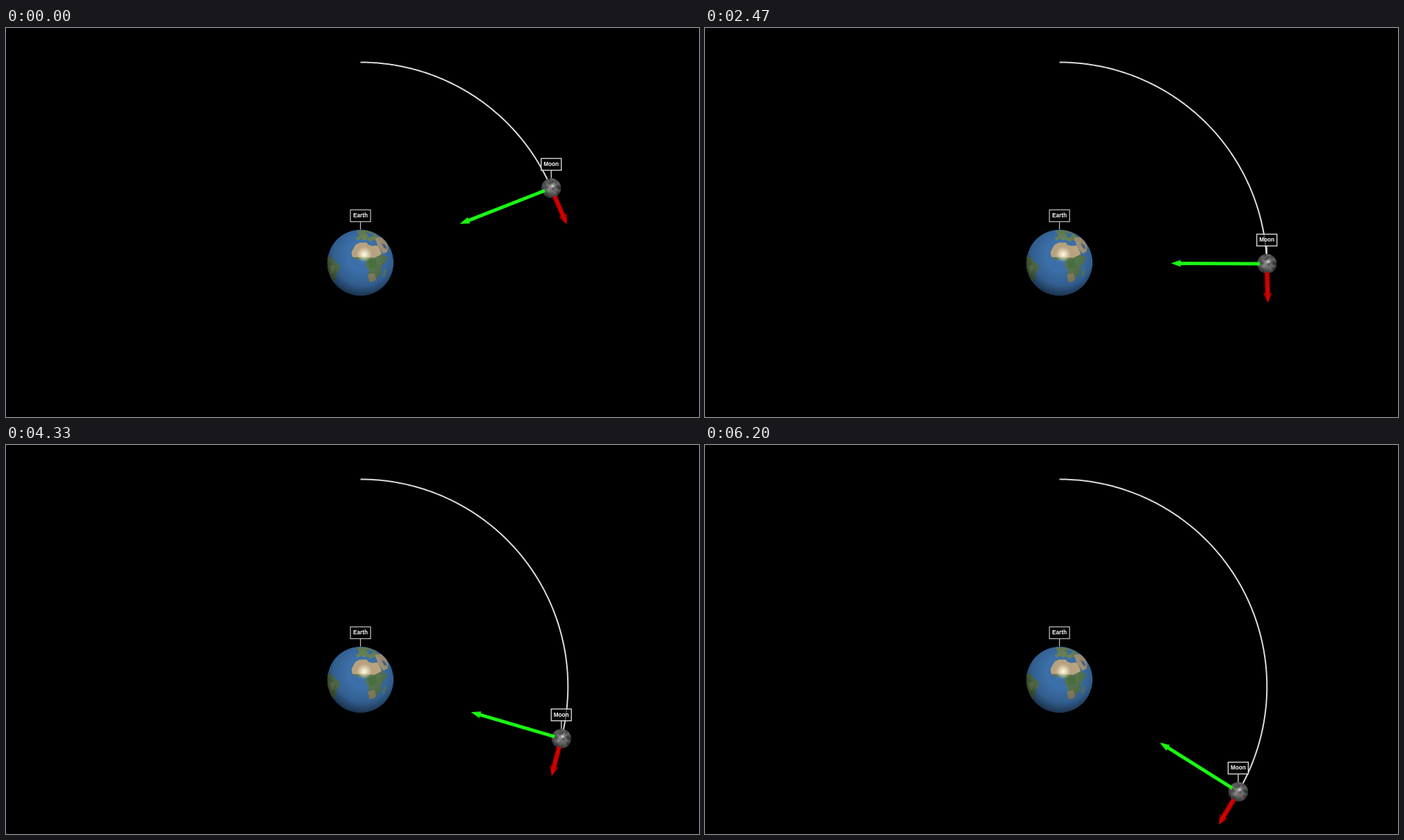
These frames come from a looping animation (998x561 px, 6.23 s). An HTML page with a canvas:

```html
<!DOCTYPE html>
<html lang="en">
<head>
<meta charset="utf-8">
<title>Moon orbit</title>
<style>
html, body { margin: 0; width: 100%; height: 100%; overflow: hidden; background: #000; }
canvas { display: block; }
</style>
</head>
<body>
<canvas id="stage" width="998" height="561"></canvas>
<script>
const ctx = document.getElementById('stage').getContext('2d');
const LOOP = 6230, TAU = Math.PI * 2, RAD = Math.PI / 180;
const EX = 510.5, EY = 338.5, ER = 47.7, MR = 14.2;
const P = 298.6, ECC = 0.033; // Kepler ellipse, closest point straight up

function orbit(a) {
  const r = P / (1 + ECC * Math.cos(a));
  return { r, x: EX + r * Math.sin(a), y: EY - r * Math.cos(a) };
}

function disc(x, y, r, fill) {
  ctx.fillStyle = fill;
  ctx.beginPath();
  ctx.arc(x, y, r, 0, TAU);
  ctx.fill();
}

function gradient(x, y, r, stops) {
  const g = ctx.createRadialGradient(x, y, 0, x, y, r);
  stops.forEach(([at, color]) => g.addColorStop(at, color));
  return g;
}

function shape(path, fill) {
  ctx.fillStyle = fill;
  ctx.fill(new Path2D(path));
}

function clipDisc(r) {
  ctx.beginPath();
  ctx.arc(0, 0, r, 0, TAU);
  ctx.clip();
}

function earth() {
  ctx.save();
  ctx.translate(EX, EY);
  clipDisc(ER);
  disc(0, 0, ER, '#3c70aa');
  // Europe and the north
  shape('M-6-46L8-47L20-42L28-36L31-31L24-30L19-33L14-30L10-34L5-32L1-35L-5-32L-7-36L-2-38L-3-42Z', '#6b8455');
  shape('M7-44L12-39L9-36L16-37L19-41Z', '#3c70aa');
  // Asia Minor and Arabia
  shape('M21-36L30-37L37-30L40-22L39-16L33-13L28-20L24-27Z', '#a8977a');
  shape('M30-29L36-25L38-20L34-21Z', '#47698e');
  // Africa
  const africa = 'M-7-26L-1-29L9-29L11-26L17-24L25-25L29-17L33-9L39-9L35 0L30 6L30 14L25 20L20 27L13 28L11 19L12 12L8 4L8-2L3-5L-6-4L-12-9L-13-15L-10-21Z';
  shape(africa, '#56754d');
  ctx.save();
  ctx.clip(new Path2D(africa));
  shape('M-15-31H31L30-12L20-7L6-8L-13-8Z', '#bba582');
  shape('M10 17L20 15L23 25L12 30Z', '#8a8362');
  shape('M9-4L22-5L24 6L14 9Z', '#47703f');
  ctx.restore();
  shape('M34 11L37 8L35 19L31 21Z', '#68805a');
  // South America
  shape('M-49-9L-41-8L-37-2L-30 3L-30 9L-34 15L-36 23L-40 31L-44 29L-49 10Z', '#56764e');
  shape('M-45 4L-37 4L-39 14L-43 16Z', '#75875a');
  // Light
  disc(0, 0, ER, gradient(4, -11, 62, [
    [0, 'rgba(255,255,255,.12)'], [.35, 'rgba(0,0,0,0)'],
    [.7, 'rgba(0,0,0,.16)'], [1, 'rgba(0,0,0,.62)']]));
  disc(5.5, -12, 11, gradient(5.5, -12, 11, [
    [0, 'rgba(255,255,235,.95)'], [.3, 'rgba(255,250,220,.7)'], [1, 'rgba(255,240,200,0)']]));
  ctx.restore();
}

function moon(x, y) {
  ctx.save();
  ctx.translate(x, y);
  clipDisc(MR);
  disc(0, 0, MR, '#797979');
  let seed = 11;
  const rnd = () => (seed = seed * 16807 % 2147483647) / 2147483647;
  for (let i = 0; i < 46; i++) {
    const a = rnd() * TAU, d = Math.sqrt(rnd()) * MR;
    disc(d * Math.cos(a), d * Math.sin(a), .6 + rnd() * 2.2,
      rnd() < .6 ? 'rgba(45,45,48,.35)' : 'rgba(165,165,165,.35)');
  }
  disc(0, 0, MR, gradient(1, -3, 18, [
    [0, 'rgba(255,255,255,.12)'], [.4, 'rgba(0,0,0,.05)'], [1, 'rgba(0,0,0,.65)']]));
  disc(2, -3, 3, gradient(2, -3, 3, [[0, 'rgba(255,255,255,.75)'], [1, 'rgba(255,255,255,0)']]));
  ctx.restore();
}

function arrow(x, y, angle, from, to, width, headWidth, edge, core) {
  ctx.save();
  ctx.translate(x, y);
  ctx.rotate(angle);
  const w = width / 2, h = headWidth / 2, neck = to - 14;
  const g = ctx.createLinearGradient(0, -h, 0, h);
  [[0, edge], [.45, core], [.55, core], [1, edge]].forEach(([at, c]) => g.addColorStop(at, c));
  shape(`M${from} ${-w}H${neck}V${-h}L${to} 0L${neck} ${h}V${w}H${from}Z`, g);
  ctx.restore();
}

function label(text, x, y, radius, color) {
  const bottom = y - radius - 11.5;
  ctx.strokeStyle = color;
  ctx.lineWidth = 1.3;
  ctx.beginPath();
  ctx.moveTo(x, y - radius);
  ctx.lineTo(x, bottom);
  ctx.stroke();
  ctx.fillStyle = 'rgba(0,0,0,.66)';
  ctx.fillRect(x - 14.5, bottom - 17, 29, 17);
  ctx.strokeRect(x - 14.5, bottom - 17, 29, 17);
  ctx.fillStyle = '#fff';
  ctx.font = 'bold 8.2px "Liberation Sans", Arial, sans-serif';
  ctx.textAlign = 'center';
  ctx.textBaseline = 'alphabetic';
  ctx.fillText(text, x, bottom - 6);
}

function trail(end) {
  ctx.beginPath();
  for (let i = 0; i <= 150; i++) {
    const p = orbit(end * i / 150);
    ctx.lineTo(p.x, p.y);
  }
  ctx.strokeStyle = '#dcdcd8';
  ctx.lineWidth = 2;
  ctx.stroke();
}

function draw(ms) {
  const s = Math.floor((ms % LOOP + 3.4) / (100 / 3)) / 30; // 30 steps a second
  const a = (68.6 + 8.9 * s - 0.043 * s * s) * RAD;
  const { r, x, y } = orbit(a);
  const vr = ECC * Math.sin(a), vt = 1 + ECC * Math.cos(a);

  ctx.fillStyle = '#000';
  ctx.fillRect(0, 0, 998, 561);
  trail(a);
  earth();
  moon(x, y);
  // Velocity, then gravity falling off with the square of the distance
  arrow(x, y, a - Math.atan2(vr, vt), 12.5, 56 * Math.hypot(vr, vt), 7, 13, '#6a0000', '#d80000');
  arrow(x, y, Math.atan2(EY - y, EX - x), 10, 12.31e6 / (r * r), 5, 10, '#12d40e', '#1cfa14');
  label('Earth', EX, EY, ER, '#b9b9b2');
  label('Moon', x, y, MR, '#e6e6e2');
}

const start = performance.now();
function tick() {
  draw(performance.now() - start);
  requestAnimationFrame(tick);
}
tick();
</script>
</body>
</html>
```
